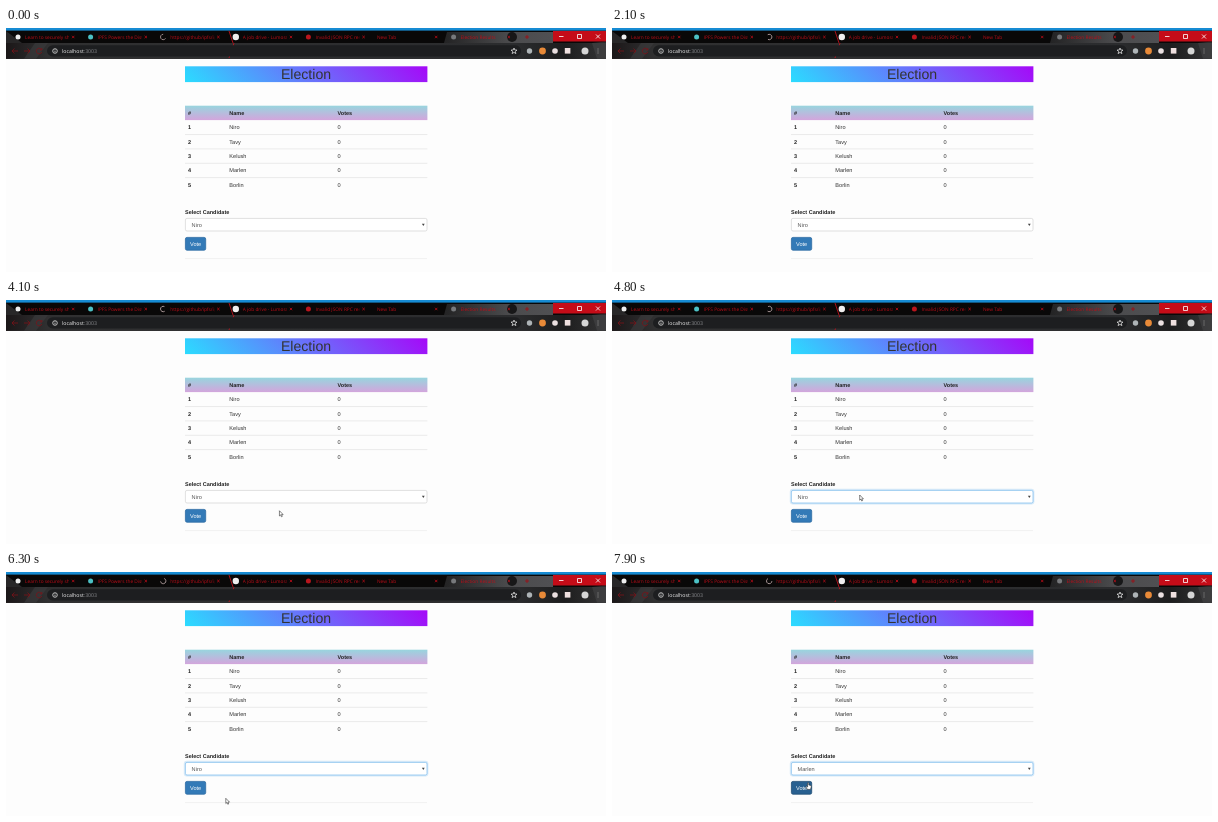
An HTML page for the animation above (8 s loop, 600x244 px).

```html
<!DOCTYPE html>
<html lang="en">
<head>
<meta charset="utf-8">
<title>Election</title>
<style>
html, body { margin: 0; width: 100%; height: 100%; overflow: hidden; background: #fdfdfd; }
svg { display: block; width: 600px; height: 244px; }
text { font: 5.6px "Liberation Sans", Arial, sans-serif; fill: #333; text-rendering: geometricPrecision; }
.bold { font-size: 5.5px; font-weight: 700; fill: #222; }
.title { font-size: 14.1px; }
.tab { font: 4.8px "Open Sans", sans-serif; fill: #bd0d18; }
.url { font: 5.2px "Open Sans", sans-serif; fill: #f0f0f0; }
.line { fill: none; stroke-width: .8; }
</style>
</head>
<body>
<svg viewBox="0 0 600 244" xmlns="http://www.w3.org/2000/svg">
  <defs>
    <linearGradient id="banner" gradientUnits="userSpaceOnUse" x1="235.6" y1="110.4" x2="364.4" y2="-18.4">
      <stop stop-color="#2bdcff"/><stop offset="1" stop-color="#a509f8"/>
    </linearGradient>
    <linearGradient id="head" x2="0" y2="1">
      <stop stop-color="#98d5de"/><stop offset="1" stop-color="#d3a5dc"/>
    </linearGradient>
    <linearGradient id="bar">
      <stop stop-color="#1b1718"/><stop offset=".07" stop-color="#303031"/>
      <stop offset=".85" stop-color="#2b2c2e"/><stop offset=".93" stop-color="#1d1d1e"/><stop offset="1" stop-color="#343435"/>
    </linearGradient>
    <linearGradient id="haze">
      <stop stop-color="#232324"/><stop offset=".6" stop-color="#4b4b4d"/><stop offset="1" stop-color="#505053"/>
    </linearGradient>
    <clipPath id="tabClip"><rect width="44" height="12" y="3"/></clipPath>
  </defs>
  <rect width="600" height="244" fill="#fdfdfd"/>

  <g id="browser">
    <rect width="600" height="30.8" fill="#090808"/>
    <rect y="15" width="600" height="15.8" fill="url(#bar)"/>
    <path d="M0 3L16 15H0zM18 30.8l11-15.8h13L30 30.8z" fill="#3d3d3e" opacity=".6"/>
    <path d="M438 15l3-11h106v11z" fill="url(#haze)"/>
    <circle cx="506" cy="9" r="5" fill="#171718"/>
    <path d="M547 3h53v10.5h-53z" fill="#c50c18"/>
    <path d="M586 15l14-1.5v17.3h-9z" fill="#454546" opacity=".6"/>
    <path d="M223 3l4 12M228 15l-5 15" stroke="#d3131f" class="line"/>
    <rect width="600" height="2.6" fill="#168bd3"/>
    <rect x="41" y="17.3" width="474" height="11.2" rx="5.6" fill="#1d1e20"/>
    <path d="M12 23H6m2.5-2.5L6 23l2.5 2.5M18 23h6m-2.5-2.5L24 23l-2.5 2.5M35.5 21.5a2.8 2.8 0 1 0 .3 2.5m0-4v2h-2" stroke="#7d1219" class="line"/>
    <circle cx="49" cy="23" r="2.3" stroke="#ddd" class="line" stroke-width=".6"/>
    <path d="M49 22.7v1.6M49 21.5v.6" stroke="#ddd" class="line"/>
    <text x="56" y="24.9" class="url">localhost<tspan fill="#8c8d90">:3003</tspan></text>
    <path d="M508 20l.8 2 2.2.1-1.7 1.4.6 2.1-1.9-1.2-1.9 1.2.6-2.1-1.7-1.4 2.2-.1z" stroke="#ddd" class="line" stroke-width=".6"/>
    <circle cx="523.5" cy="23" r="2.7" fill="#aeb4b7"/>
    <circle cx="536.5" cy="23" r="3.4" fill="#e98a38"/>
    <circle cx="549" cy="23" r="2.8" fill="#eadfe0"/>
    <rect x="558.8" y="20" width="5.6" height="5.6" fill="#efe0e0"/>
    <circle cx="579" cy="23" r="3.5" fill="#d6d6d6"/>
    <path d="M592 20.5v1m0 1v1m0 1v1" stroke="#aaa" class="line"/>
    <path d="M553 8.5h4.5M571.5 6.5h4v4h-4zM590 6.5l4 4m0-4l-4 4" stroke="#fff" class="line" stroke-width=".7"/>
    <path id="spinner" d="M0-2.7A2.7 2.7 0 1 0 2.34 1.35" stroke="#b9a5a5" class="line"/>
  </g>

  <rect x="179" y="38.3" width="242.4" height="15.8" fill="url(#banner)"/>
  <text x="300" y="51.2" class="title" text-anchor="middle">Election</text>

  <g id="table">
    <rect x="179" y="77.7" width="242.4" height="14.4" fill="url(#head)"/>
    <text x="182" y="86.5" class="bold">#</text>
    <text x="223.3" y="86.5" class="bold">Name</text>
    <text x="331.6" y="86.5" class="bold">Votes</text>
  </g>

  <text x="179" y="186" class="bold">Select Candidate</text>
  <rect id="glow" x="178.6" y="189.6" width="243" height="14.2" rx="2.2" stroke="#66afe9" stroke-opacity=".25" fill="none" stroke-width="1.6"/>
  <rect id="select" x="179.4" y="190.4" width="241.6" height="12.6" rx="1.6" fill="#fff" stroke-width=".6"/>
  <text id="choice" x="185.6" y="198.6" style="fill:#555"></text>
  <path d="M415.9 195.8h2.8l-1.4 2.2z" fill="#444"/>
  <rect id="button" x="179.4" y="209.4" width="20.3" height="12.8" rx="1.6" stroke-width=".8"/>
  <text x="184" y="217.8" style="fill:#fff">Vote</text>
  <path d="M179 230.6h242" stroke="#eee" class="line"/>

  <g id="cursor" stroke="#222" stroke-width=".55" fill="#fff">
    <path id="arrow" d="M0 0V5.2L1.2 4.1 2 6 2.9 5.6 2.1 3.8H3.7z"/>
    <path id="hand" d="M-.6.5Q0-.4.6.5V2.6L2.7 3.1Q3.3 3.4 3 4.6L2.3 7H-.8L-2.3 4.4-1.6 3.8-.6 4.6z"/>
  </g>
</svg>
<script>
const LOOP = 8000, STEP = 100;
const el = id => document.getElementById(id);

function add(parent, tag, attrs, content = "") {
  const node = document.createElementNS("http://www.w3.org/2000/svg", tag);
  for (const key in attrs) node.setAttribute(key, attrs[key]);
  node.textContent = content;
  el(parent).append(node);
  return node;
}

const tabs = [
  ["Learn to securely share", "#eee"], ["IPFS Powers the Distributed", "#4cc1c5"],
  ["https://github/ipfs/ipfs", null], ["A job drive - Lumora", "#f0eeee"],
  ["Invalid JSON RPC resp", "#b9151d"], ["New Tab", null], ["Election Results", "#77797c"]
];
tabs.forEach(([label, icon], i) => {
  const x = 12 + i * 72.6;
  if (icon) add("browser", "circle", { cx: x, cy: 9, r: i === 3 ? 3.2 : 2.5, fill: icon });
  const left = label === "New Tab" ? x - 4 : x + 7;
  const group = add("browser", "g", { transform: `translate(${left})`, "clip-path": "url(#tabClip)" });
  group.append(add("browser", "text", { y: 10.8, class: "tab" }, label));
  add("browser", "path", { d: `M${x + 54} 7.8l2.4 2.4m0-2.4l-2.4 2.4`, stroke: "#bd0d18", class: "line" });
});
add("browser", "path", { d: "M519 9h4m-2-2v4", stroke: "#a30b14", class: "line" });

const candidates = ["Niro", "Tavy", "Kelush", "Marlen", "Borlin"];
candidates.forEach((name, i) => {
  const y = 101.2 + i * 14.35;
  if (i) add("table", "path", { d: `M179 ${y - 9}h242.4`, stroke: "#e6e6e6", class: "line" });
  add("table", "text", { x: 182, y, class: "bold" }, i + 1);
  add("table", "text", { x: 223.3, y }, name);
  add("table", "text", { x: 331.6, y }, 0);
});

// time, x, y of the pointer tip; y beyond 244 is off stage
const path = [
  [0, 314, 250], [100, 314, 250], [200, 314, 241.8], [1400, 314, 241.8], [1500, 314, 250],
  [3500, 290, 250], [3600, 290, 217.5], [4000, 282, 216], [4400, 247.7, 195],
  [4900, 247.7, 195], [5700, 222, 221.8], [5900, 219.8, 226.3], [7600, 219.8, 226.3],
  [7800, 196.2, 210.4], [LOOP, 196.2, 210.4]
];

function pointerAt(t) {
  const i = path.findIndex(p => p[0] > t);
  const [t0, x0, y0] = path[i - 1], [t1, x1, y1] = path[i];
  const k = (t - t0) / (t1 - t0);
  return [x0 + (x1 - x0) * k, y0 + (y1 - y0) * k];
}

function draw(now) {
  const t = Math.floor((now % LOOP) / STEP) * STEP;
  const [x, y] = pointerAt(t);
  const focused = t >= 4500, hover = t >= 7800;
  el("cursor").setAttribute("transform", `translate(${x} ${y})`);
  el("arrow").style.display = hover ? "none" : "";
  el("hand").style.display = hover ? "" : "none";
  el("glow").style.display = focused ? "" : "none";
  el("select").setAttribute("stroke", focused ? "#66afe9" : "#ccc");
  el("choice").textContent = candidates[t >= 7000 ? 3 : 0];
  el("button").setAttribute("fill", hover ? "#286090" : "#337ab7");
  el("button").setAttribute("stroke", hover ? "#204d74" : "#2e6da4");
  el("spinner").setAttribute("transform", `translate(157.2 9) rotate(${t * .27})`);
}

const start = performance.now();
function tick() {
  draw(performance.now() - start);
  requestAnimationFrame(tick);
}
tick();
</script>
</body>
</html>
```
